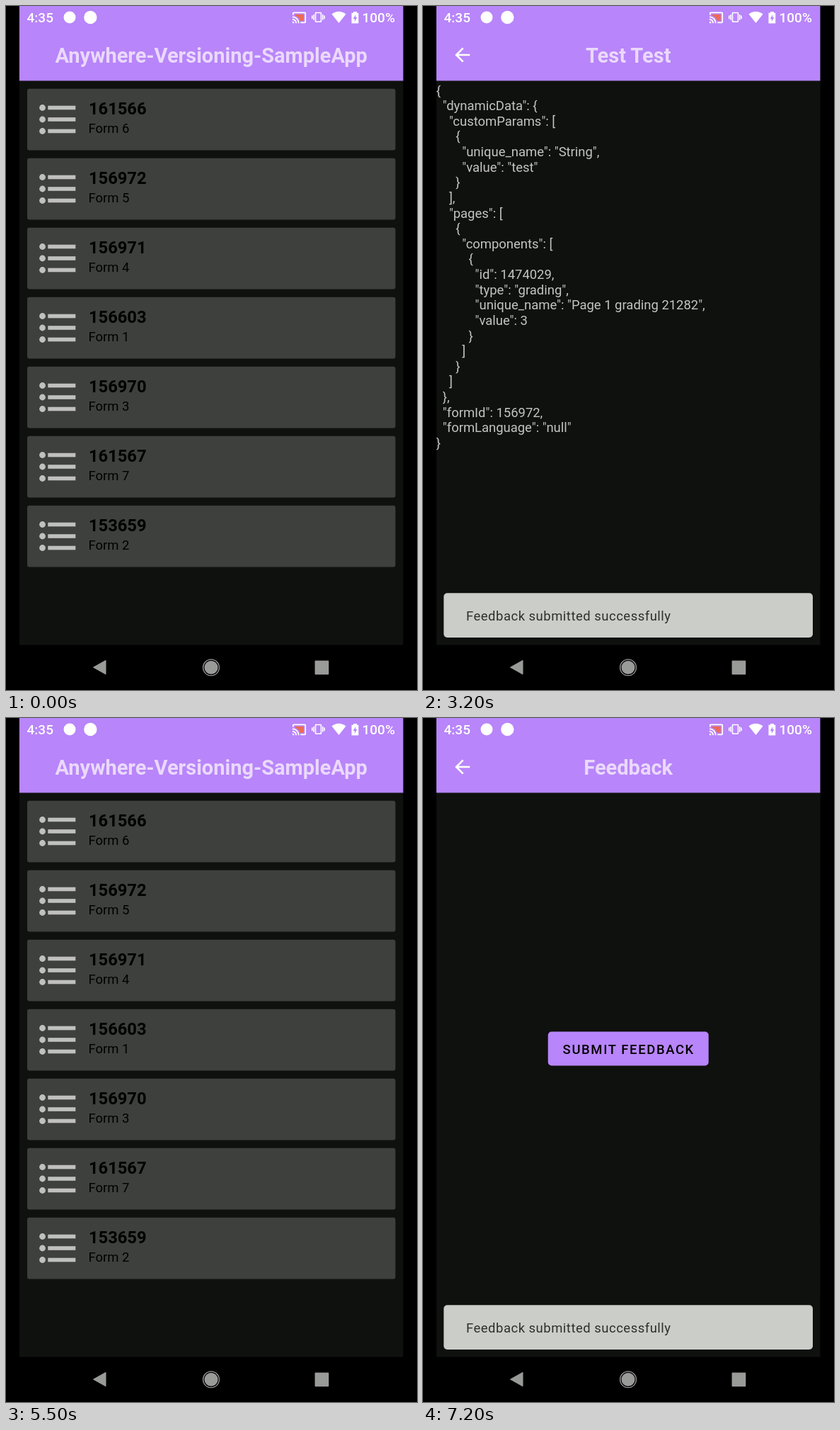
Write an HTML page that moves like this. It is 581 by 965 pixels and loops after 8000 ms.

```html
<!DOCTYPE html>
<html lang="en">
<head>
<meta charset="utf-8">
<title>Form list demo</title>
<style>
  html, body { margin: 0; width: 100%; height: 100%; overflow: hidden; background: #000; }
  svg { display: block; width: 100vw; height: 100vh; }
  text { font: 18.45px Roboto, sans-serif; white-space: pre; }
  .title { font-size: 29px; font-weight: 700; fill: #ead9fc; text-anchor: middle; }
  .id { font-size: 23.7px; font-weight: 700; }
  .json { fill: #c3c4c2; }
  .button { font-weight: 500; letter-spacing: 1.65px; }
  .note { fill: #2e302d; letter-spacing: .52px; }
  .status { font-size: 19px; font-weight: 500; }
</style>
</head>
<body>
<svg viewBox="0 0 581 965">
  <defs>
    <clipPath id="screen"><rect x="18.7" width="543" height="965"/></clipPath>
    <clipPath id="buttonShape"><rect x="176.7" y="442.5" width="227" height="48" rx="5"/></clipPath>
    <g id="base">
      <rect x="18.7" width="543" height="965"/>
      <rect x="18.7" width="543" height="901.5" fill="#0f110e"/>
      <rect x="18.7" width="543" height="105.5" fill="#b885fa"/>
    </g>
    <g id="bullets" fill="#c0c1bf">
      <g id="bullet"><circle cx="51.5" cy="26.5" r="4.4"/><rect x="59.3" y="23.7" width="39" height="5.6"/></g>
      <use href="#bullet" y="16.5"/>
      <use href="#bullet" y="33"/>
    </g>
  </defs>
  <rect width="581" height="965"/>
  <g clip-path="url(#screen)">
    <g id="list">
      <use href="#base"/>
      <text class="title" x="290.2" y="80.2">Anywhere-Versioning-SampleApp</text>
      <g id="cards"></g>
    </g>
    <g id="form">
      <use href="#base"/>
      <path transform="translate(39.9 53.2) scale(1.318)" fill="#fff"
        d="M20 11H7.83l5.59-5.59L12 4l-8 8 8 8 1.41-1.41L7.83 13H20z"/>
      <text class="title" id="heading" x="290.2" y="80.2"></text>
      <g id="submit">
        <g clip-path="url(#buttonShape)">
          <rect x="176" y="442" width="229" height="50" fill="#b885fa"/>
          <circle id="ripple" cy="466.5"/>
        </g>
        <text class="button" x="197.6" y="473.5">SUBMIT FEEDBACK</text>
      </g>
      <g id="json"></g>
      <g id="snackbar">
        <rect x="29.3" y="828.3" width="521.7" height="62.7" rx="5" fill="#cbcdc9"/>
        <text class="note" x="61" y="867">Feedback submitted successfully</text>
      </g>
    </g>
  </g>
  <g fill="#fff">
    <text class="status" x="29.5" y="23">4:35</text>
    <circle cx="90" cy="16" r="8.5"/>
    <circle cx="119.3" cy="16" r="9.2"/>
    <g transform="translate(404.1 5.9) scale(.87)">
      <path d="M19 7H5v1.63c3.96 1.28 7.09 4.41 8.37 8.37H19z" fill="#ee6a55"/>
      <path d="M21 3H3c-1.1 0-2 .9-2 2v3h2V5h18v14h-7v2h7c1.1 0 2-.9 2-2V5c0-1.1-.9-2-2-2zM1 18v3h3c0-1.66-1.34-3-3-3zm0-4v2c2.76 0 5 2.24 5 5h2c0-3.87-3.13-7-7-7zm0-4v2c4.97 0 9 4.03 9 9h2c0-6.08-4.93-11-11-11z"/>
    </g>
    <path transform="translate(432 6.4) scale(.79)"
      d="M0 15h2V9H0zm3 2h2V7H3zm19-8v6h2V9zm-3 8h2V7h-2zM16.500 3h-9C6.670 3 6 3.670 6 4.500v15c0 .83.67 1.500 1.500 1.500h9c.83 0 1.500-.67 1.500-1.500v-15c0-.83-.67-1.500-1.500-1.500zM16 19H8V5h8z"/>
    <path d="M470.500 24L460.500 11.500Q470.500 4 480.500 11.500Z"/>
    <path d="M491 8h5v1.800h2.300v14.700h-9.800V9.800h2.500z"/>
    <path d="M494.300 12l-3.500 6h2v4l3.500-6h-2z" fill="#b885fa"/>
    <text class="status" x="503.500" y="23">100%</text>
  </g>
  <g fill="#999b98">
    <path d="M123.500 933L141 923.200V942.800Z" stroke="#999b98" stroke-linejoin="round"/>
    <circle cx="290" cy="933.300" r="9.500"/>
    <circle cx="290" cy="933.300" r="11.400" fill="none" stroke="#999b98" stroke-width="1.300"/>
    <rect x="436.600" y="923.500" width="19.700" height="19.700" rx="1"/>
  </g>
</svg>
<script>
const $ = id => document.getElementById(id);
const clamp = v => Math.min(1, Math.max(0, v));
const ramp = (t, start, length) => clamp((t - start) / length);

const forms = [[161566, 6], [156972, 5], [156971, 4], [156603, 1], [156970, 3], [161567, 7], [153659, 2]];
$('cards').innerHTML = forms.map(([id, n], i) => `
  <g transform="translate(0 ${117 + i * 98})">
    <rect x="30" y="-.2" width="520.5" height="86.7" rx="3" fill="#3e403d"/>
    <use href="#bullets"/>
    <text class="id" x="117" y="35.5">${id}</text>
    <text x="116.500" y="62.200">Form ${n}</text>
  </g>`).join('');

const feedback = {
  dynamicData: {
    customParams: [{ unique_name: 'String', value: 'test' }],
    pages: [{ components: [{ id: 1474029, type: 'grading', unique_name: 'Page 1 grading 21282', value: 3 }] }]
  },
  formId: 156972,
  formLanguage: 'null'
};
$('json').innerHTML = JSON.stringify(feedback, null, 2).split('\n').map((line, i) =>
  `<text class="json" x="18.700" y="${125.6 + i * 21.62}">${line}</text>`).join('');

const bezier = (u, [a, b, c, d]) => {
  const v = 1 - u;
  return a * v * v * v + 3 * b * v * v * u + 3 * c * v * u * u + d * u * u * u;
};

// Fast start with a very slow finish, made of two joined curves
function ease(x) {
  const [xs, ys] = x < 1 / 6
    ? [[0, .05, .1333, 1 / 6], [0, 0, .06, .4]]
    : [[1 / 6, .2083, .25, 1], [.4, .82, 1, 1]];
  let low = 0, high = 1;
  for (let i = 0; i < 24; i++) {
    const mid = (low + high) / 2;
    if (bezier(mid, xs) < x) low = mid; else high = mid;
  }
  return bezier(low, ys);
}

function place(el, scale, opacity, cx = 290.2, cy = 482.5) {
  el.setAttribute('transform', `translate(${cx} ${cy}) scale(${scale}) translate(${-cx} ${-cy})`);
  el.setAttribute('opacity', opacity);
}

function showPages(t) {
  const closing = t >= 4850 && t < 5400;
  const start = closing ? 4850 : t < 4850 ? 150 : 5542;
  const p = ramp(t, start, 400), e = ease(p), d = t - start;
  if (closing) {
    place($('list'), 1.1 - .1 * e, 1);
    place($('form'), 1 - .1 * e, 1 - ramp(d, 66, 50));
  } else {
    place($('list'), 1 + .05 * e, 1 - .85 * p);
    place($('form'), .85 + .15 * e, ramp(d, 35, 50));
  }
}

function showRipple(t) {
  const [start, fade] = t < 5400 ? [885, 1120] : [6290, 6430];
  const grow = 1 - (1 - ramp(t, start, 225)) ** 3;
  const ripple = $('ripple');
  ripple.setAttribute('cx', 314 - 24 * grow);
  ripple.setAttribute('r', 68 + 48 * grow);
  ripple.setAttribute('opacity', t < start ? 0 : .115 * (1 - ramp(t, fade, 160)));
}

function showSnackbar(t) {
  const p = ramp(t, t < 5400 ? 1570 : 6970, 150);
  const gone = t < 5400 ? ramp(t, 4547, 75) : 0;
  place($('snackbar'), .8 + .2 * (1 - (1 - p) ** 3), p * (1 - gone), 290.2, 859.6);
}

function draw(now) {
  const t = Math.floor(now % 8000 / 100) * 100; // ten pictures a second
  const answered = t >= 3200 && t < 5400;
  $('heading').textContent = t < 5400 ? 'Test Test' : 'Feedback';
  $('submit').style.display = answered ? 'none' : '';
  $('json').style.display = answered ? '' : 'none';
  showPages(t);
  showRipple(t);
  showSnackbar(t);
}

let begin;
function loop(now) {
  begin ??= now;
  draw(now - begin);
  requestAnimationFrame(loop);
}
draw(0);
requestAnimationFrame(loop);
</script>
</body>
</html>
```
